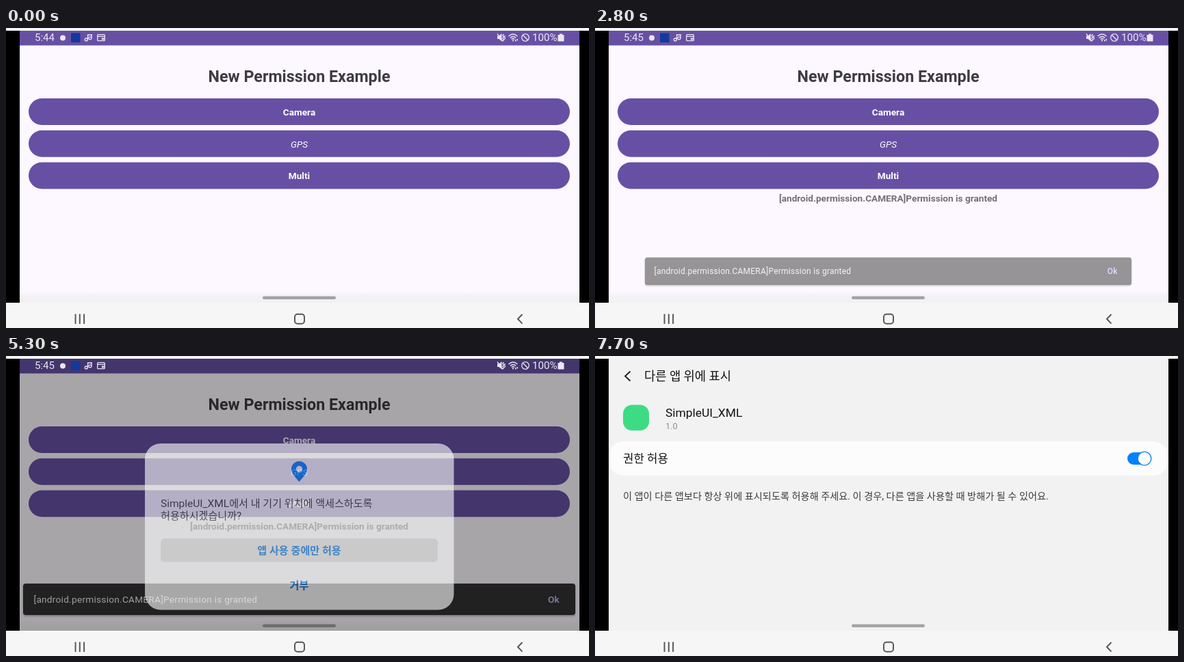
These frames come from a looping animation (852x439 px, 8000 ms). An HTML page:

```html
<!DOCTYPE html>
<html lang="ko">
<head>
<meta charset="utf-8">
<title>Permission example</title>
<style>
  html, body { margin: 0; width: 100%; height: 100%; overflow: hidden; background: #f6f6f6; }
  svg { display: block; width: 852px; height: 439px; font-family: Roboto, 'Noto Sans CJK KR', 'Noto Sans CJK', sans-serif; }
  text { white-space: pre; }
  .mid { text-anchor: middle; }
  .bold { font-weight: 700; }
  .line { fill: none; stroke-width: 1.3; }
</style>
</head>
<body>
<svg viewBox="0 0 852 439" xmlns="http://www.w3.org/2000/svg">
  <defs>
    <clipPath id="screen"><rect x="20" y="4" width="818" height="398"/></clipPath>
    <clipPath id="choice"><rect x="226" y="267" width="405" height="34.500" rx="6"/></clipPath>
    <filter id="shade" x="-5%" y="-30%" width="110%" height="170%">
      <feDropShadow dx="0" dy="1.500" stdDeviation="1.500" flood-opacity=".3"/>
    </filter>
    <linearGradient id="foot" x2="0" y2="1">
      <stop stop-color="#fdf8ff"/><stop offset=".4" stop-color="#f4f1f5"/><stop offset="1" stop-color="#f2f0f3"/>
    </linearGradient>
  </defs>

  <rect width="852" height="439" fill="#f6f6f6"/>
  <rect y="4" width="852" height="398"/>

  <g clip-path="url(#screen)">
    <rect x="20" y="4" width="818" height="398" fill="#fdf8ff"/>
    <rect x="20" y="386" width="818" height="16" fill="url(#foot)"/>
    <rect x="20" y="4" width="818" height="21.500" fill="#6750a4"/>
    <text class="mid bold" x="428.500" y="79.300" font-size="23.300" fill="#3f3b43">New Permission Example</text>
    <g id="buttons"></g>
    <g class="mid bold" font-size="13.600" fill="#45414a">
      <text id="result0" x="428.500" y="253.800">[android.permission.CAMERA]Permission is granted</text>
      <text id="result1" x="428.500" y="271.900">[android.permission.ACCESS_FINE_LOCATION]Permission is granted</text>
    </g>
    <g id="snack0"></g>
    <g id="snack1"></g>
    <rect class="handle" x="375" y="392.500" width="107" height="4.500" rx="2.200" fill="#a5a2a7"/>
    <rect id="dim" x="20" y="4" width="818" height="398"/>

    <g id="status" fill="#ebe6f3" stroke="#ebe6f3" stroke-width="0">
      <text id="clock" x="42" y="19.300" font-size="15"></text>
      <circle cx="83" cy="14.500" r="4"/>
      <rect x="95" y="7.500" width="13.500" height="13.500" fill="#12399b"/>
      <path class="line" d="M119.500 16.500V10h5.500v4.500M119.500 10h6.500"/>
      <circle class="line" cx="117.300" cy="17" r="2"/><circle class="line" cx="122.900" cy="14.800" r="2"/>
      <rect class="line" x="133.700" y="9.700" width="10.600" height="9" rx="1"/>
      <path class="line" d="M134 12.300h10M140.500 15.200h2.500v1.500h-2.500z"/>
      <path d="M718 11.500h2.500l4-3.500v11.500l-4-3.500H718z"/>
      <path class="line" d="M718 8.500l8 11M727.500 9l-1.500 2 1.500 2-1.500 2 1.500 2-1 2M729.500 11l-1 2 1 2-1 2"/>
      <path class="line" d="M734.500 12q6.500-6 13 0M736.700 14.400q4.300-3.800 8.600 0M738.700 16.500q2.300-2 4.600 0"/>
      <circle cx="741" cy="18.400" r="1.100"/><path d="M744 17h1.500v2.500H744zM746.500 16h1.500v2.500h-1.500z"/>
      <circle class="line" cx="759" cy="14" r="5.300"/><path class="line" d="M755.300 10.300l7.400 7.400"/>
      <text x="769" y="19.300" font-size="15.200">100%</text>
      <path d="M809 8.500h4V10h2.500v9.500h-9V10h2.500z"/>
    </g>

    <g id="dialog">
      <rect x="203" y="128" width="451.500" height="243.500" rx="23" fill="#fcfcfc"/>
      <g id="pin">
        <path fill="#0381fe" d="M428.500 184C421 175.500 417 171 417 165.500a11.500 11.500 0 0 1 23 0C440 171 436 175.500 428.500 184z"/>
        <circle cx="428.500" cy="165.300" r="4.600" fill="#fcfcfc"/>
      </g>
      <g id="camera">
        <path fill="#0381fe" d="M419 159h4l2-3h7l2 3h4q3 0 3 3v15q0 3-3 3h-19q-3 0-3-3v-15q0-3 3-3z"/>
        <circle cx="428.500" cy="169" r="5.500" fill="none" stroke="#fcfcfc" stroke-width="2"/>
      </g>
      <g font-size="15.500" fill="#3a3a3c">
        <text x="226" y="220.500">SimpleUI_XML<tspan id="ask" font-size="15.100"></tspan></text>
        <text x="226" y="238.700" font-size="15.100">허용하시겠습니까?</text>
      </g>
      <g clip-path="url(#choice)"><circle id="touch" cy="284" fill="#e1e1e1"/></g>
      <g class="mid bold" font-size="15.100" fill="#0070d6">
        <text id="allow" x="428.500" y="290.300"></text>
        <text x="428.500" y="340.700">거부</text>
      </g>
    </g>

    <g id="settings">
      <rect x="20" y="4" width="818" height="398" fill="#f2f2f2"/>
      <path d="M51.500 22.500l-7.500 7 7.500 7" fill="none" stroke="#1a1a1a" stroke-width="1.800"/>
      <text x="72" y="36.200" font-size="17.700" fill="#111">다른 앱 위에 표시</text>
      <rect x="41" y="71.500" width="38" height="37.500" rx="13" fill="#3ddc84"/>
      <text x="103" y="88.800" font-size="17.400" fill="#111">SimpleUI_XML</text>
      <text x="103" y="107" font-size="12.600" fill="#8f8f8f">1.0</text>
      <rect x="20" y="125" width="818" height="50" rx="22" fill="#fcfcfc"/>
      <text x="41" y="156.300" font-size="16.800" fill="#111">권한 허용</text>
      <circle id="halo" cx="804" cy="150" r="19"/>
      <rect id="track" x="778" y="141" width="35" height="18" rx="9"/>
      <circle id="knob" cy="150" r="9.800" fill="#fdfdfd" stroke-width="1.300"/>
      <text x="41" y="210.300" font-size="14.200" fill="#3c3c3c">이 앱이 다른 앱보다 항상 위에 표시되도록 허용해 주세요. 이 경우, 다른 앱을 사용할 때 방해가 될 수 있어요.</text>
      <rect x="375" y="392.500" width="107" height="4.500" rx="2.200" fill="#a5a5a5"/>
    </g>
  </g>

  <g fill="none" stroke="#595959" stroke-width="2">
    <path d="M101.500 418.500v14.500M107.800 418.500v14.500M114.100 418.500v14.500"/>
    <rect x="422" y="418.800" width="14" height="14" rx="4"/>
    <path d="M754.500 419l-6.500 6.800 6.500 6.800"/>
  </g>
</svg>

<script>
const LOOP = 8000, STEP = 100, CENTER = 428.5;
const $ = id => document.getElementById(id);
const set = (id, attrs) => { for (const k in attrs) $(id).setAttribute(k, attrs[k]); };
const ramp = (t, from, to) => Math.min(1, Math.max(0, (t - from) / (to - from)));
const pulse = (t, a, b, c, d) => ramp(t, a, b) * (1 - ramp(t, c, d));
const mix = (a, b, p) => a + (b - a) * p;
const show = (id, opacity) => set(id, { opacity });

const buttons = [
  { label: 'Camera', style: 'font-weight="700"', press: 1400, full: 1690, release: 1850, gone: 2050, alpha: .245 },
  { label: 'GPS', style: 'font-style="italic"', press: 3400, full: 3650, release: 3780, gone: 3980, alpha: .27 },
  { label: 'Multi', style: 'font-weight="700"', press: 5790, full: 6004, release: 6300, gone: 6700, alpha: .295 }
];

const dialogs = [
  { open: 1880, press: 2300, close: 2450, icon: 'camera', ask: '에서 사진을 촬영하고 동영상을 녹화하도록', allow: '허용' },
  { open: 3780, press: 5000, close: 5250, icon: 'pin', ask: '에서 내 기기 위치에 액세스하도록', allow: '앱 사용 중에만 허용' }
];

const snacks = [
  { name: 'CAMERA', enter: 2725, leave: 5420 },
  { name: 'ACCESS_FINE_LOCATION', enter: 5500, leave: LOOP }
];

$('buttons').innerHTML = buttons.map((b, i) => {
  const y = 103 + 46.7 * i;
  const pill = `x="33" y="${y}" width="791" height="39" rx="19.500"`;
  return `<clipPath id="pill${i}"><rect ${pill}/></clipPath>
    <rect ${pill} fill="#6750a4"/>
    <circle id="ripple${i}" cy="${y + 19.5}" fill="#fff" clip-path="url(#pill${i})"/>
    <text class="mid" x="${CENTER}" y="${y + 25}" font-size="13.600" fill="#fff" ${b.style}>${b.label}</text>`;
}).join('');

snacks.forEach((s, i) => {
  $('snack' + i).innerHTML = `
    <rect x="25" y="333" width="807" height="46" rx="4" fill="#313033" filter="url(#shade)"/>
    <text x="40.500" y="361" font-size="13.600" letter-spacing=".28" fill="#f4eff4">[android.permission.${s.name}]Permission is granted</text>
    <text x="792" y="361" font-size="13.600" font-weight="500" letter-spacing=".1" fill="#d0bcff">Ok</text>`;
});

function drawButtons(t) {
  buttons.forEach((b, i) => {
    const grow = ramp(t, b.press, b.full);
    set('ripple' + i, {
      cx: mix(390, CENTER + 1, grow),
      r: 400 * grow,
      opacity: b.alpha * (1 - ramp(t, b.release, b.gone))
    });
  });
}

function drawSnacks(t) {
  snacks.forEach((s, i) => {
    const p = ramp(t, s.enter, s.enter + 150);
    const scale = .8 + .2 * p ** 1.3;
    set('snack' + i, {
      opacity: p * (1 - ramp(t, s.leave, s.leave + 100)),
      transform: `translate(${CENTER} 356) scale(${scale}) translate(${-CENTER} -356)`
    });
  });
  show('result0', ramp(t, 2650, 2850));
  show('result1', ramp(t, 5400, 5600));
}

function drawDialog(t) {
  const d = dialogs[t < 3000 ? 0 : 1];
  const press = ramp(t, d.press, d.press + 250);
  show('dim', .45 * pulse(t, d.open, d.open + 200, d.close, d.close + 200));
  show('dialog', pulse(t, d.open - 30, d.open + 100, d.close, d.close + 130));
  show('pin', +(d.icon === 'pin'));
  show('camera', +(d.icon === 'camera'));
  $('ask').textContent = d.ask;
  $('allow').textContent = d.allow;
  set('touch', { cx: mix(388, CENTER, press), r: 310 * press });
}

function drawSettings(t) {
  const slide = 1 - (1 - ramp(t, 6200, 6700)) ** 3;
  const on = ramp(t, 7350, 7600);
  const color = on > .4 ? '#0381fe' : '#a8a8ad';
  set('settings', { transform: `translate(${818 * (1 - slide)} 0)` });
  set('track', { fill: color });
  set('knob', { cx: mix(788.5, 803, on), stroke: color });
  show('halo', .08 * pulse(t, 7350, 7500, 7550, 7700));
}

function draw(time) {
  const t = Math.floor(time % LOOP / STEP) * STEP;
  $('clock').textContent = t < 2400 ? '5:44' : '5:45';
  drawButtons(t);
  drawSnacks(t);
  drawDialog(t);
  drawSettings(t);
}

const start = performance.now();
function tick() {
  draw(performance.now() - start);
  requestAnimationFrame(tick);
}
tick();
</script>
</body>
</html>
```
